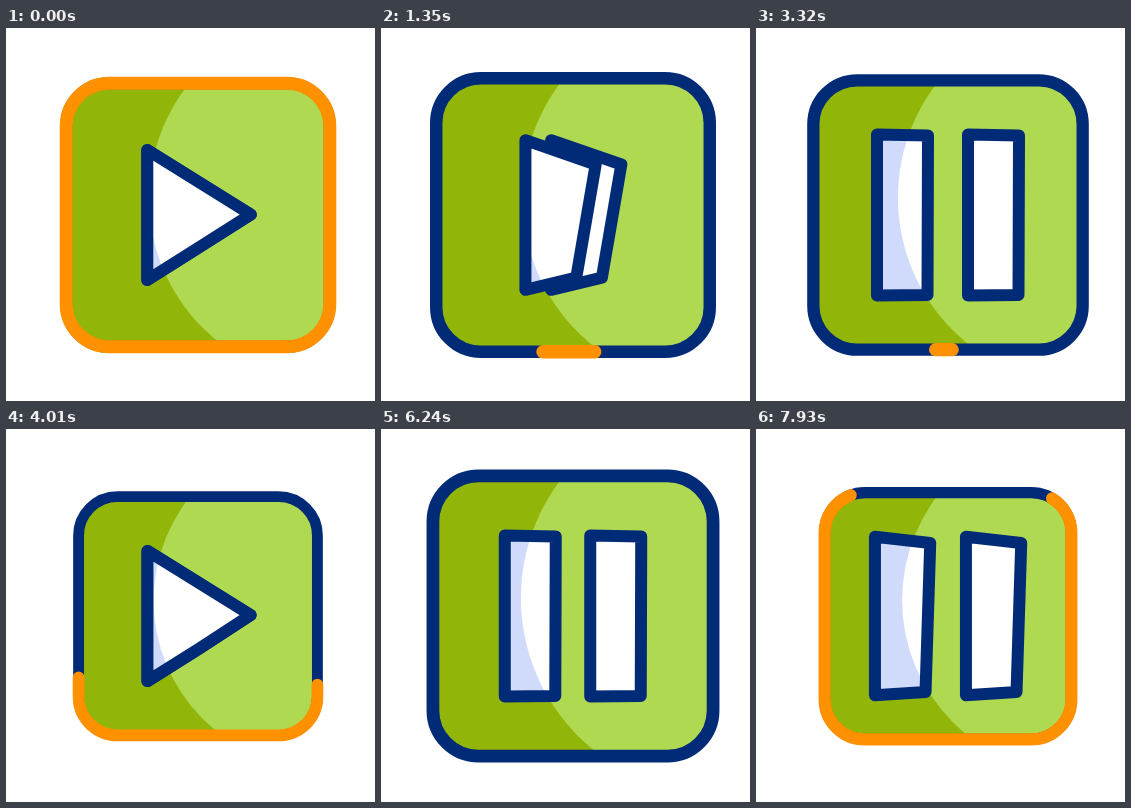
Animation of 369 by 373 pixels, one loop 8000 ms. Source, as an HTML page:

```html
<!DOCTYPE html>
<html lang="en">
<head>
<meta charset="utf-8">
<title>Play and pause button</title>
<style>
  html, body { margin: 0; width: 100%; height: 100%; overflow: hidden; background: #fff; }
  svg { display: block; width: 100vw; height: 100vh; }
  .edge { fill: none; stroke: #022b77; stroke-width: 12; stroke-linejoin: round; stroke-linecap: round; }
  #ring { stroke: #ff9100; stroke-width: 13; }
</style>
</head>
<body>
<svg viewBox="0 0 369 373">
  <defs>
    <path id="frame" pathLength="1000"
      d="M-4 131.8H-88.8a43 43 0 0 1-43-43V-88.8a43 43 0 0 1 43-43H88.8a43 43 0 0 1 43 43V88.8a43 43 0 0 1-43 43Z"/>
    <clipPath id="inside"><use href="#frame"/></clipPath>
    <clipPath id="lit"><circle id="spot"/></clipPath>
  </defs>
  <g id="button">
    <g clip-path="url(#inside)">
      <rect x="-140" y="-140" width="280" height="280" fill="#92b509"/>
      <circle cx="135" cy="-17" r="184" fill="#b0d952"/>
    </g>
    <use href="#frame" class="edge"/>
    <path id="ring" class="edge" pathLength="1000"/>
  </g>
  <g id="icon"></g>
</svg>
<script>
const LOOP = 8000, CYCLE = 2505, START = 1163, HALF = 1480;
const CX = 192, CY = 187;
const PULSE = [[0, 1], [107, 1.09], [337, .906], [543, .906], [773, 1.09], [880, 1]];

const byId = id => document.getElementById(id);
const mix = (a, b, k) => a + (b - a) * k;

function ease(t, from, length) {
  const k = Math.min(1, Math.max(0, (t - from) / length));
  return k * k * (3 - 2 * k);
}

function pulse(t) {
  return PULSE.slice(1).reduce((value, [end, next], i) => {
    const [begin, last] = PULSE[i];
    return value + (next - last) * ease(t, begin, end - begin);
  }, 1);
}

const button = byId('button'), ring = byId('ring'), spot = byId('spot');
ring.setAttribute('d', byId('frame').getAttribute('d'));

function addPanel() {
  const layer = (attrs) => {
    const shape = document.createElementNS('http://www.w3.org/2000/svg', 'polygon');
    for (const name in attrs) shape.setAttribute(name, attrs[name]);
    byId('icon').append(shape);
    return shape;
  };
  return [
    layer({ fill: '#d0dbfc' }),
    layer({ fill: '#fff', 'clip-path': 'url(#lit)' }),
    layer({ class: 'edge' })
  ];
}
const back = addPanel(), front = addPanel();

// bars: 0 is the triangle, 1 is an upright bar
function drawPanel(layers, x, bars) {
  const points = [
    [x, mix(122, 106.5, bars)],
    [x + mix(103.5, 51, bars), mix(186.5, 107.5, bars)],
    [x + mix(51.5, 50.5, bars), mix(219.5, 267, bars)],
    [x, mix(252, 267.5, bars)]
  ].join(' ');
  layers.forEach(shape => shape.setAttribute('points', points));
}

function drawRing(fill) {
  const length = 1000 * fill;
  ring.style.display = fill > 0 ? '' : 'none';
  ring.style.strokeDasharray = fill < 1 ? `${length} ${1000 - length}` : 'none';
  ring.style.strokeDashoffset = length / 2;
}

function draw(time) {
  const t = (time % LOOP - START + CYCLE) % CYCLE;

  const size = pulse(t < HALF ? t : t - HALF);
  button.setAttribute('transform', `translate(${CX} ${CY}) scale(${size})`);
  spot.setAttribute('cx', CX + 135 * size);
  spot.setAttribute('cy', CY - 17 * size);
  spot.setAttribute('r', 184 * size);

  drawRing(ease(t, 108, 586) - ease(t, HALF + 82, 645));

  const apart = 1 - ease(t, 32, 240) + ease(t, 1492, 240);
  const bars = 1 - ease(t, 71, 285) + ease(t, 1519, 290);
  const middle = mix(141.3, 166.5, bars);
  drawPanel(back, middle + 45.5 * apart, bars);
  drawPanel(front, middle - 45.5 * apart, bars);
}

const begin = performance.now();
function tick() {
  draw(performance.now() - begin);
  requestAnimationFrame(tick);
}
tick();
</script>
</body>
</html>
```
